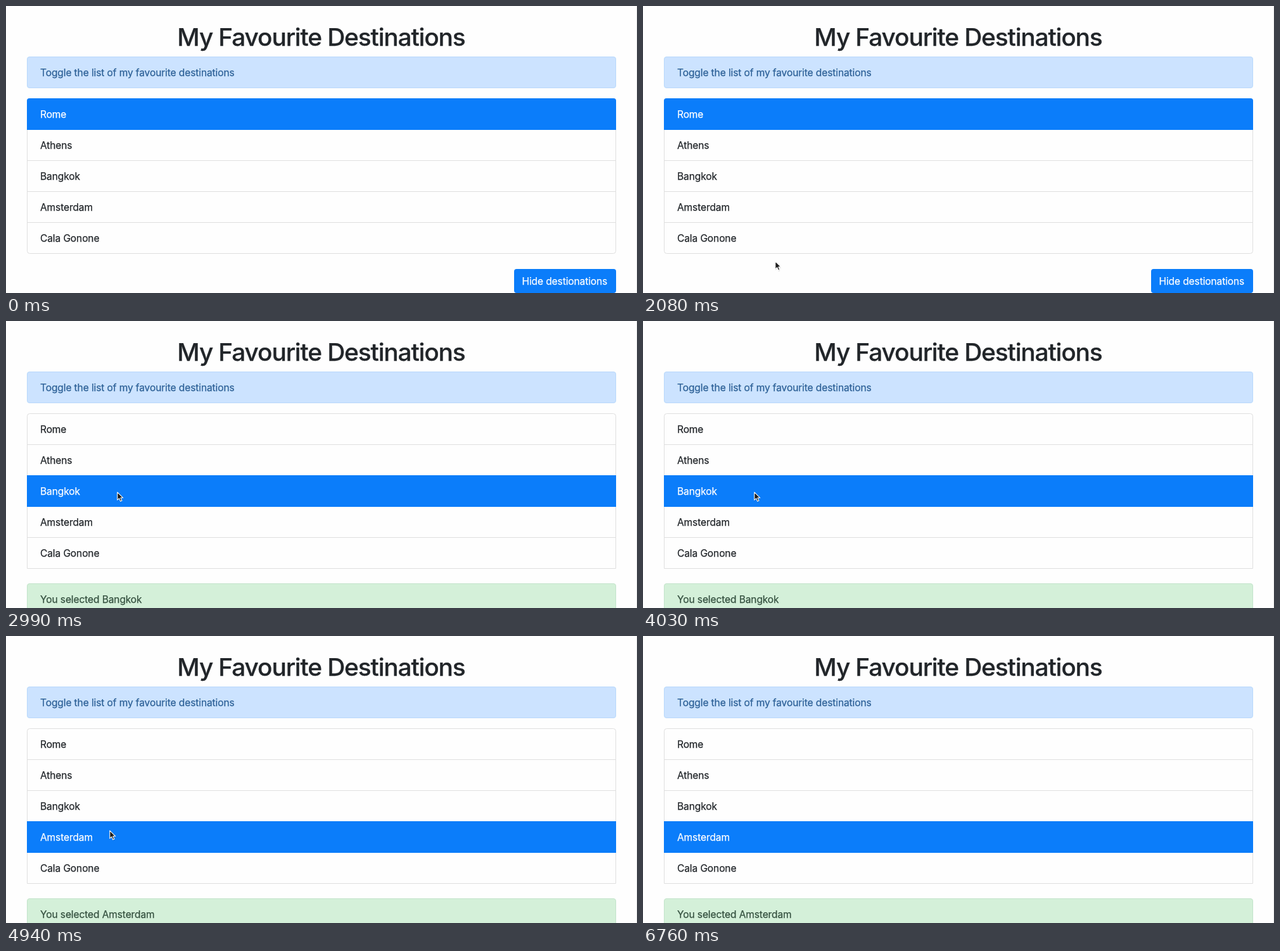
Animation, 996 px wide and 454 px high, one loop 6890 ms. Source, as an HTML page:

```html
<!DOCTYPE html>
<html lang="en">
<head>
<meta charset="utf-8">
<title>My Favourite Destinations</title>
<style>
html, body { margin: 0; width: 100%; height: 100%; overflow: hidden; background: #fefefe; }
svg { display: block; width: 996px; height: 454px; }
text {
  font: 400 15.5px Inter, Roboto, sans-serif;
  font-optical-sizing: none;
  letter-spacing: -.09px;
  color: #212529;
  fill: currentColor;
  stroke: currentColor;
  stroke-width: .25px;
}
.title { font-size: 38.8px; font-weight: 500; letter-spacing: -1.1px; text-anchor: middle; }
.info { fill: #cce3ff; stroke: #b8d8fb; }
.info-text { color: #2c6096; }
.done { fill: #d4f0d9; stroke: #c3e4cb; }
.done-text { color: #34503f; }
.line { fill: none; stroke: #dfdfdf; }
.blue { fill: #0b7dfa; filter: blur(.4px); }
.light { color: #fff; }

.rome, .bangkok, .amsterdam, .done-box, .cursor {
  animation: 6890ms step-end infinite;
}
.rome { animation-name: rome; }
.bangkok { animation-name: bangkok; }
.amsterdam { animation-name: amsterdam; }
.done-box { animation-name: done; }
.cursor { animation-name: move; }

@keyframes rome {
  0% { visibility: visible; }
  43.39%, 100% { visibility: hidden; }
}
@keyframes done {
  0% { visibility: hidden; }
  43.39%, 100% { visibility: visible; }
}
@keyframes bangkok {
  0% { visibility: hidden; }
  43.39% { visibility: visible; }
  71.69%, 100% { visibility: hidden; }
}
@keyframes amsterdam {
  0% { visibility: hidden; }
  71.69%, 100% { visibility: visible; }
}
/* The pointer is sampled every 130 ms */
@keyframes move {
  0% { transform: translate(214px, 500px); }
  28.30% { transform: translate(214px, 444px); }
  30.18% { transform: translate(208px, 403px); }
  32.07% { transform: translate(197px, 350px); }
  33.96% { transform: translate(186px, 305px); }
  35.84% { transform: translate(179px, 280px); }
  37.73% { transform: translate(176px, 271px); }
  39.62% { transform: translate(175px, 270px); }
  66.03% { transform: translate(169px, 291px); }
  67.92% { transform: translate(163px, 307px); }
  88.67% { transform: translate(164px, 312px); }
  90.56% { transform: translate(166px, 325px); }
  92.45% { transform: translate(171px, 352px); }
  94.33% { transform: translate(178px, 390px); }
  96.22% { transform: translate(186px, 431px); }
  98.11%, 100% { transform: translate(190px, 500px); }
}
</style>
</head>
<body>
<svg viewBox="0 0 996 454">
  <rect width="996" height="454" fill="#fefefe"/>
  <path d="M995.5 0V454" stroke="#ebebeb"/>

  <text class="title" x="497.5" y="63">My Favourite Destinations</text>
  <rect class="info" x="33.5" y="80.5" width="929" height="49" rx="3.5"/>
  <text class="info-text" x="54" y="111">Toggle the list of my favourite destinations</text>

  <path class="line" d="M33.5 387V150.5a4 4 0 0 1 4-4H958.5a4 4 0 0 1 4 4V387"/>
  <path class="line" d="M34 195.5H962M34 244.5H962M34 293.5H962M34 342.5H962"/>
  <text x="54" y="177">Rome</text>
  <text x="54" y="226">Athens</text>
  <text x="54" y="275">Bangkok</text>
  <text x="54" y="324">Amsterdam</text>
  <text x="54" y="373">Cala Gonone</text>

  <g class="rome">
    <path class="line" d="M33.5 387v.5a4 4 0 0 0 4 4H958.5a4 4 0 0 0 4-4V387"/>
    <path class="blue" d="M33 196V150a4 4 0 0 1 4-4H959a4 4 0 0 1 4 4V196z"/>
    <text class="light" x="54" y="177">Rome</text>
    <rect class="blue" x="802" y="416" width="161" height="38" rx="4"/>
    <text class="light" x="814.5" y="441">Hide destionations</text>
  </g>

  <g class="done-box">
    <path class="line" d="M33.5 387V391.5H962.5V387"/>
    <rect class="done" x="33.5" y="415.5" width="929" height="49" rx="3.5"/>
  </g>

  <g class="bangkok">
    <rect class="blue" x="33" y="244" width="930" height="50"/>
    <text class="light" x="54" y="275">Bangkok</text>
    <text class="done-text" x="54" y="446">You selected Bangkok</text>
  </g>

  <g class="amsterdam">
    <rect class="blue" x="33" y="293" width="930" height="50"/>
    <text class="light" x="54" y="324">Amsterdam</text>
    <text class="done-text" x="54" y="446">You selected Amsterdam</text>
  </g>

  <g class="cursor">
    <path d="M1 2V15L4 12.4 6 17 8.4 16 6.4 11.4H10.4z" fill="#000" opacity=".12"/>
    <path d="M.8.8V13.2L3.7 10.6 5.7 15.2 7.9 14.2 5.9 9.8H9.8z" fill="#1c1c1c" stroke="#fff" stroke-width="1.1" stroke-linejoin="round"/>
  </g>
</svg>
</body>
</html>
```
